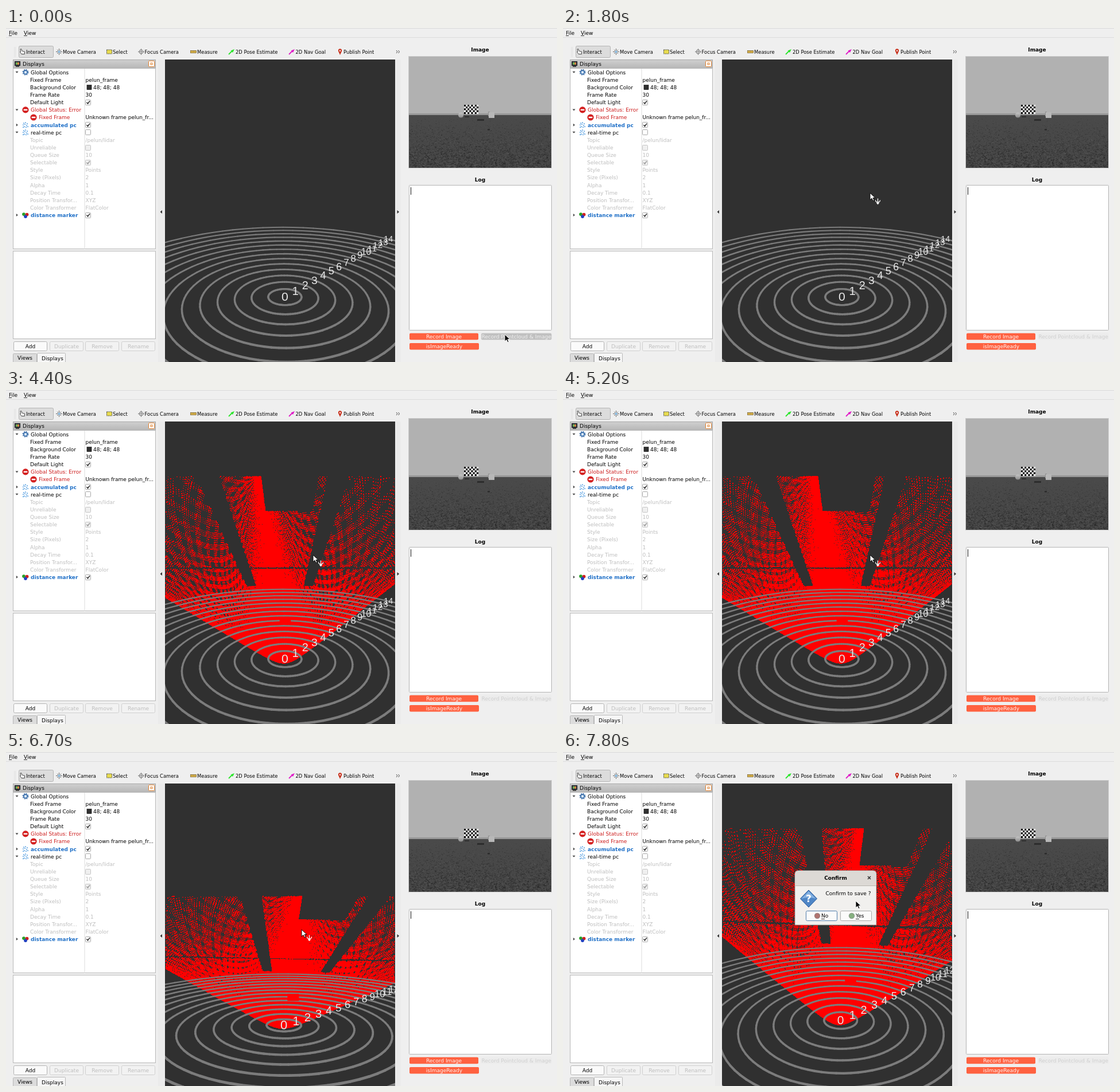
An HTML page with a canvas for the animation above (8000 ms loop, 960 by 583 pixels).

```html
<!DOCTYPE html>
<html lang="en">
<head>
<meta charset="utf-8">
<title>Point cloud recorder</title>
<style>
  html, body { margin: 0; width: 960px; height: 583px; overflow: hidden; background: #efefef; }
  svg, canvas { position: absolute; display: block; }
  svg { left: 0; top: 0; }
  #view { left: 277px; top: 55px; }
  #photo { left: 702px; top: 50px; }
  text { font: 9px "DejaVu Sans", sans-serif; fill: #000; white-space: pre; }
  .b { font-weight: bold; }
  .tool { font-size: 8.4px; }
  .mid { text-anchor: middle; }
  .off { fill: #bebebe; }
  .err { fill: #cc1a1a; }
  .link { fill: #2171c8; font-weight: bold; }
</style>
</head>
<body>
<svg id="ui" width="960" height="583"></svg>
<canvas id="photo" width="248" height="194"></canvas>
<canvas id="view" width="401" height="528"></canvas>
<svg id="top" width="960" height="583"></svg>
<script>
const $ = id => document.getElementById(id);
const rad = Math.PI / 180;

// ---------- SVG helpers ----------
const attrs = o => Object.entries(o).map(([k, v]) => ` ${k}="${v}"`).join('');
const rect = (x, y, w, h, fill, o = {}) =>
  `<rect x="${x}" y="${y}" width="${w}" height="${h}" fill="${fill}"${attrs(o)}/>`;
const circle = (x, y, r, fill, o = {}) => `<circle cx="${x}" cy="${y}" r="${r}" fill="${fill}"${attrs(o)}/>`;
const path = (d, fill, o = {}) => `<path d="${d}" fill="${fill}"${attrs(o)}/>`;
const line = (d, stroke, w = 1) => path(d, 'none', { stroke, 'stroke-width': w });
const text = (x, y, s, cls = '', o = {}) => `<text x="${x}" y="${y}" class="${cls}"${attrs(o)}>${s}</text>`;
const box = (x, y, w, h, fill, stroke, rx = 0) => rect(x + .5, y + .5, w - 1, h - 1, fill, { stroke, rx });

// ---------- static window ----------
function toolbar() {
  const labels = [[35, 'Interact'], [99, 'Move Camera'], [186, 'Select'], [241.5, 'Focus Camera'], [333, 'Measure'],
    [400, '2D Pose Estimate'], [504.5, '2D Nav Goal'], [588, 'Publish Point']];
  const arrow = (x, c) => line(`M${x} 46L${x + 6} 40`, c, 1.8) + path(`M${x + 10} 37L${x + 3.5} 39.5L${x + 7} 43Z`, c);
  return box(22, 31, 61, 21, '#dcdcdc', '#b4b4b4', 2) + line('M14.5 33V51M16.5 33V51', '#e2e2e2') +
    path('M25 37l1.5-.5 2 4 4 .8v4.2h-5.5l-2.5-4 1.5-.5z', '#fff', { stroke: '#333', 'stroke-width': .9 }) +
    line('M87 41.5h11M92.5 36v11M89 38l7 7M96 38l-7 7', '#555', .9) + circle(92.5, 41.5, 2, '#8cc0e8') +
    rect(175.5, 38, 9, 7, '#e8dc50', { stroke: '#444', 'stroke-dasharray': '2 1' }) +
    circle(235.5, 41.5, 3.5, 'none', { stroke: '#777' }) + line('M230 41.500h11M235.500 36v11', '#777', .9) +
    rect(321.5, 39.5, 10, 4, '#e8c050', { stroke: '#665020', 'stroke-width': .7 }) +
    line('M324 40v2M326.500 40v2M329 40v2', '#665020', .6) +
    arrow(388, '#2ce62c') + arrow(493, '#e01cc8') +
    path('M582 47L579 40.5a3.2 3.2 0 1 1 6 0Z', '#c8321e') + circle(582, 39.8, 1.2, '#fff') +
    labels.map(([x, s]) => text(x, 44.8, s, 'tool')).join('') +
    line('M680 39l2 2.5-2 2.5M683.5 39l2 2.5-2 2.5', '#333', .9);
}

const rowY = i => 77.3 + 13.12 * i;
const check = (y, on, dim) => box(138, Math.round(y) - 5, 10, 10, dim ? '#f0f0f0' : '#fff', dim ? '#c4c4c4' : '#a8a8a8', 1) +
  (on ? line(`M140.5 ${y}l2 2.3 3.5-4.8`, dim ? '#999' : '#222', 1.5) : '');
const cloudIcon = y => [[-3, -3], [0, -4], [3, -2], [-4, 0], [-1, -1], [2, 1], [4, 3], [-2, 3], [1, 4], [-4, 4]]
  .map(([x, d]) => circle(34 + x, y + d, .9, '#3a90dc')).join('');
const stopIcon = (x, y) => circle(x, y, 5.6, '#d42020') + rect(x - 3.3, y - 1.2, 6.6, 2.4, '#fff');

function tree() {
  // label, value (true/false is a check box), class, label x
  const rows = [['Global Options', , '', 43], ['Fixed Frame', 'pelun_frame'], ['Background Color', '48; 48; 48'],
    ['Frame Rate', '30'], ['Default Light', true], ['Global Status: Error', , 'err', 43],
    ['Fixed Frame', 'Unknown frame pelun_fr...', 'err', 57], ['accumulated pc', true, 'link', 43],
    ['real-time pc', false, '', 43], ['Topic', '/pelun/lidar', 'off'], ['Unreliable', false, 'off'],
    ['Queue Size', '10', 'off'], ['Selectable', true, 'off'], ['Style', 'Points', 'off'], ['Size (Pixels)', '2', 'off'],
    ['Alpha', '1', 'off'], ['Decay Time', '0.1', 'off'], ['Position Transfor...', 'XYZ', 'off'],
    ['Color Transformer', 'FlatColor', 'off'], ['distance marker', true, 'link', 43]];
  let s = line('M137 71V386', '#dcdcdc');
  rows.forEach(([label, value, cls = '', x = 42], i) => {
    const y = rowY(i);
    s += text(x, y + 3.4, label, cls);
    if (typeof value === 'boolean') s += check(y, value, cls === 'off');
    else if (value) s += text(i === 2 ? 152 : 138.5, y + 3.4, value, cls === 'off' ? cls : '');
  });
  const down = i => path(`M16.5 ${rowY(i) - 1.5}h5l-2.5 3z`, '#444');
  const right = i => path(`M17.8 ${rowY(i) - 2.5}v5l3-2.5z`, '#444');
  s += [0, 5, 8].map(down).join('') + [7, 19].map(right).join('');
  s += circle(34, rowY(0), 3.4, '#a8c8e8', { stroke: '#3c6ea8', 'stroke-width': 1.6 }) +
    circle(34, rowY(0), 4.8, 'none', { stroke: '#3c6ea8', 'stroke-width': 1.4, 'stroke-dasharray': '1.9 1.9' }) +
    circle(34, rowY(0), 1.2, '#fff');
  s += rect(141, rowY(2) - 4, 8, 8, '#303030', { stroke: '#000', 'stroke-width': .6 });
  s += stopIcon(34, rowY(5)) + stopIcon(48, rowY(6)) + cloudIcon(rowY(7)) + cloudIcon(rowY(8));
  const m = rowY(19);
  return s + circle(31, m - 1.5, 2.9, '#28a028') + circle(36.5, m - 1, 2.9, '#d02020') + circle(34, m + 2.5, 2.9, '#2040c0');
}

function drawWindow() {
  const button = (x, s, cls) => box(x, 547, 59, 17, cls ? '#f2f2f2' : '#fafafa', cls ? '#d0d0d0' : '#b4b4b4', 2) +
    text(x + 29.5, 559, s, 'mid ' + cls);
  const orange = (y, w, s) => rect(703, y, w, 11.5, '#ff6140', { rx: 2 }) +
    text(703 + w / 2, y + 9, s, 'mid', { style: 'fill:#fff4f0' });
  $('ui').innerHTML = rect(0, 0, 960, 583, '#efefef') + rect(0, 0, 960, 1, '#dadada') + line('M0 16.5H960', '#dcdcdc') +
    text(5, 12, 'File') + text(31, 12, 'View') + line('M5 13.5h5M31 13.5h6', '#000', .8) + toolbar() +
    '<linearGradient id="bar" x2="0" y2="1"><stop stop-color="#d0d0d0"/><stop offset="1" stop-color="#b6b6b6"/></linearGradient>' +
    box(12, 55, 249, 16, 'url(#bar)', '#a8a8a8') + box(15, 58, 10, 8, '#303848', '#222') + rect(17, 66, 6, 2, '#444') +
    rect(17, 60, 3, 4, '#70b050') + rect(20, 60, 3, 4, '#d08040') + text(29, 66.3, 'Displays') +
    box(248, 57, 11, 11, '#fff', '#e0802c', 1) + rect(252, 61, 3, 3, 'none', { stroke: '#e0802c' }) +
    box(12, 70, 249, 316, '#fff', '#b8b8b8') + tree() +
    box(12, 389, 249, 154, '#fff', '#b8b8b8') +
    button(13, 'Add', '') + button(76, 'Duplicate', 'off') + button(138, 'Remove', 'off') + button(201, 'Rename', 'off') +
    box(12, 568, 42, 20, '#dcdcdc', '#b8b8b8', 1) + box(54, 567, 50, 20, '#f6f6f6', '#b8b8b8', 1) +
    text(20, 579.3, 'Views') + text(62, 580, 'Displays') +
    rect(265, 55, 11, 528, '#ebebeb') + rect(679, 55, 9, 528, '#ebebeb') +
    path('M272 318v6l-3.5-3z', '#333') + path('M681.5 318v6l3.5-3z', '#333') +
    text(826, 41, 'Image', 'b mid') + text(826, 267.5, 'Log', 'b mid') +
    rect(701.5, 49.5, 249, 195, 'none', { stroke: '#ccc' }) +
    box(702, 274, 249, 254, '#fff', '#b4b4b4', 1) + line('M705.5 278V291', '#111') +
    orange(532.7, 120, 'Record Image') + orange(550, 121, 'isImageReady') +
    rect(828, 532.7, 122.5, 11.5, '#c0c0c0', { rx: 2, id: 'recBox' }) +
    text(889.2, 541.7, 'Record Pointcloud &amp; Image', 'mid', { id: 'recText' });
}

function drawPhoto() {
  const g = $('photo').getContext('2d');
  const fill = (c, x, y, w, h) => { g.fillStyle = c; g.fillRect(x, y, w, h); };
  const ramp = (y0, y1, a, b) => {
    const r = g.createLinearGradient(0, y0, 0, y1);
    r.addColorStop(0, a); r.addColorStop(1, b);
    return r;
  };
  fill('#b1b1b1', 0, 0, 248, 101);
  fill('#989898', 0, 99, 248, 3);
  fill(ramp(102, 194, '#4a4a4a', '#444'), 0, 102, 248, 92);
  let seed = 7;
  const rnd = () => (seed = seed * 16807 % 2147483647) / 2147483647;
  for (let i = 0; i < 5200; i++) {
    const k = Math.sqrt(rnd()), v = rnd() < .5 ? 24 + rnd() * 25 : 75 + rnd() * 30;
    fill(`rgba(${v},${v},${v},.5)`, rnd() * 248, 103 + k * 91, .8 + k * 1.3, .6 + k * .5);
  }
  fill('#2c2c2c', 119, 109, 12, 3);
  fill('#303030', 97, 104, 8, 2);
  fill('#262626', 137, 126.5, 4, 2);
  g.fillStyle = ramp(97, 107, '#c8c8c8', '#888');
  g.beginPath(); g.arc(90.5, 102, 4.6, 0, 7); g.fill();
  fill('#909090', 138, 96, 3, 8);
  fill('#b8b8b8', 139, 97, 10, 10);
  for (let i = 0; i < 40; i++)
    fill((i % 8 + (i >> 3)) % 2 ? '#fff' : '#080808', 96 + i % 8 * 3.125, 84 + (i >> 3) * 3.2, 3.2, 3.2);
}

// ---------- 3D view ----------
const W = 401, H = 528, focal = 637, orbit = 21.25, focus = [-.29, .6, 5.2], labelAngle = 41.3 * rad;
const ctx = $('view').getContext('2d');
const img = ctx.createImageData(W, H), pix = new Uint32Array(img.data.buffer);

// Orbit camera: maps a ground point to [screen x, screen y, depth].
function camera(pitch, yaw) {
  const c = Math.cos(pitch * rad), s = Math.sin(pitch * rad), cy = Math.cos(yaw * rad), sy = Math.sin(yaw * rad);
  const drop = orbit * s + focus[2];
  return (x, y, out) => {
    x -= focus[0]; y -= focus[1];
    const ahead = y * cy - x * sy + orbit * c;
    out[2] = ahead * c + drop * s;
    out[0] = W / 2 + focal * (x * cy + y * sy) / out[2];
    out[1] = H / 2 + focal * (drop * c - ahead * s) / out[2];
    return out;
  };
}

// Rosette scan of a lidar whose rays fall on the ground plane.
const rate = 230, scanStart = 1900;
const scan = (() => {
  const n = rate * 3300, px = [], py = [], born = [];
  const lidarH = .6, back = 1.35, axis = -3.1 * rad, spread = .64;
  for (let i = 0; i < n; i++) {
    const p = i * .007, r = Math.tan(spread * Math.cos(p)), v = r * Math.sin(p * .2236);
    if (v >= -1e-5) continue;
    const u = r * Math.cos(p * .2236), f = -lidarH / v, d = f * Math.sqrt(1 + u * u);
    const a = Math.atan(u) + axis, deg = a / rad, y = d * Math.cos(a) - back;
    const shadow = y > 15 && (deg > -12.5 && deg < -9.2 || deg > 7.2 && deg < 10.4) ||
      y > 96 && deg > -2.9 && deg < 5.8 || y > 22.1 && y < 22.9;
    if (shadow) continue;
    px.push(d * Math.sin(a)); py.push(y); born.push(i);
  }
  return { x: Float32Array.from(px), y: Float32Array.from(py), born };
})();

function drawScan(project, limit) {
  const p = [0, 0, 0], { x, y, born } = scan, half = .75;
  pix.fill(0xff303030);
  for (let i = 0; i < born.length && born[i] < limit; i++) {
    project(x[i], y[i], p);
    if (p[2] < .1 || p[0] < 1 || p[1] < 1 || p[0] > W - 1 || p[1] > H - 1) continue;
    const x1 = Math.round(p[0] + half), y1 = Math.round(p[1] + half);
    for (let py = Math.round(p[1] - half); py < y1; py++)
      for (let px = Math.round(p[0] - half); px < x1; px++) pix[py * W + px] = 0xff0000ff;
  }
  ctx.putImageData(img, 0, 0);
}

function drawView(pitch, yaw, limit) {
  const project = camera(pitch, yaw);
  const polar = (r, a) => project(r * Math.sin(a), r * Math.cos(a), []);
  drawScan(project, limit);
  ctx.strokeStyle = '#7c7c7c';
  ctx.lineCap = 'round';
  for (let r = 1; r <= 14; r++) {
    let a = polar(r, 0);
    for (let k = 1; k <= 90; k++) {
      const b = polar(r, k * 4 * rad);
      ctx.lineWidth = 72 / b[2];
      ctx.beginPath(); ctx.moveTo(a[0], a[1]); ctx.lineTo(b[0], b[1]); ctx.stroke();
      a = b;
    }
  }
  if (limit > 0) {
    const [x, y, d] = project(.1, 5.9, []);
    ctx.fillStyle = '#f00';
    ctx.fillRect(x - 270 / d, y - 160 / d, 540 / d, 330 / d);
  }
  ctx.fillStyle = '#e8e8e8';
  ctx.textAlign = 'center';
  for (let n = 0; n <= 14; n++) {
    const [x, y, d] = polar(n, labelAngle), size = 465 / d;
    ctx.font = `${size}px "Liberation Sans", Arial, sans-serif`;
    ctx.fillText(n, x, y + size * .35);
  }
}

// ---------- dialogs and pointer ----------
function dialog(id, x, w, question, noX, yesX, focusYes) {
  const btn = (bx, s, c, hot, fill) => box(bx, 277, 55, 18, fill, hot ? '#4f7cab' : '#aaa', 2) +
    circle(bx + 20, 286, 4.8, c, { stroke: '#777', 'stroke-width': .6 }) + text(bx + 27, 289.3, s) +
    line(`M${bx + 27} 291.5h6`, '#000', .8);
  const icx = x + 24;
  return `<g id="${id}">` +
    path(`M${x} 302V213q0-6 6-6h${w - 12}q6 0 6 6V302z`, '#f1f0ee', { stroke: '#8a8884', 'stroke-width': .8 }) +
    path(`M${x + .5} 233V213q0-5.5 5.5-5.5h${w - 12}q5.5 0 5.5 5.5V233z`, '#dcd9d5') +
    line(`M${x} 233.5h${w}`, '#bab6b0') + text(x + w / 2, 222.5, 'Confirm', 'b mid') +
    line(`M${x + w - 15} 217l5 5m0-5l-5 5`, '#333', 1.5) +
    path(`M${icx} 241l14.5 15-14.5 15-14.5-15z`, '#4f86c6', { stroke: '#2c5d9c' }) +
    path(`M${icx} 243l12.5 13q-12.5-4-25 0z`, '#86b2e2') +
    text(icx, 262, '?', 'b mid', { style: 'fill:#fff;font-size:17px' }) +
    text(x + 53.5, 250.3, question) +
    btn(noX, 'No', '#b07470', !focusYes, '#fbfbfa') + btn(yesX, 'Yes', '#86b080', focusYes, focusYes ? '#c3cfdc' : '#fbfbfa') + '</g>';
}

const arrowShape = 'M0 0V12L3 9.3L5 13.6L7 12.7L5.1 8.5H9Z';
function drawTop() {
  $('top').innerHTML = dialog('ask', 400, 150, 'Confirm to record ?', 428, 487, true) +
    dialog('save', 404, 142, 'Confirm to save ?', 423, 483, false) +
    '<g id="click">' + circle(535, 286, 12, 'none', { stroke: '#e01818', 'stroke-width': 1.3 }) +
    circle(535, 286, 5, 'none', { stroke: '#e01818', 'stroke-width': 1.2 }) + '</g><g id="pointer">' +
    path(arrowShape, '#000', { id: 'arrow', 'stroke-width': .9 }) +
    '<g id="hint">' + line('M13.5 9.5V19M9.5 12.5q0 3.5 4 3.5t4-3.5M11.5 17l2 2.3 2-2.3', '#fff', 1.3) + '</g></g>';
}

// ---------- timeline ----------
// Each key is [time, value, value].
const pointerKeys = [[100, 869, 535], [900, 535, 288], [5300, 535, 288], [5700, 522, 256], [6200, 511, 267],
  [6700, 515, 310], [7300, 515, 311], [7700, 510, 260]];
const cameraKeys = [[5300, 14.8, 0], [5700, 2.11, 5.2], [6200, 6, 6.3], [6800, 6, 6.3], [7000, 13.2, 6.3],
  [7300, 13.2, 6.3], [7500, 16.24, 6.9]];
const scanTimes = [2000, 2100, 2200, 2400, 2900, 3200, 3300, 3500, 3700, 3900, 4200, 4400, 4700, 4900, 5000, 5100, 5200];

function at(keys, t) {
  const i = keys.findIndex(k => k[0] > t);
  if (i < 0) return keys[keys.length - 1].slice(1);
  if (i === 0) return keys[0].slice(1);
  const a = keys[i - 1], b = keys[i], k = (t - a[0]) / (b[0] - a[0]);
  return [a[1] + (b[1] - a[1]) * k, a[2] + (b[2] - a[2]) * k];
}
const show = (id, on) => { $(id).style.display = on ? '' : 'none'; };

let lastView = '';
function render(t) {
  const [pitch, yaw] = at(cameraKeys, t), [x, y] = at(pointerKeys, t);
  const update = scanTimes.filter(s => s <= t).pop() || scanStart;
  const key = [pitch, yaw, update].join();
  if (key !== lastView) drawView(pitch, yaw, rate * (update - scanStart));
  lastView = key;

  show('ask', t >= 300 && t < 1500);
  show('save', t >= 7600);
  show('click', t >= 1000 && t < 1500);
  const inView = t >= 700 && t < 7600;
  show('hint', inView);
  $('pointer').setAttribute('transform', `translate(${x} ${y})`);
  $('arrow').setAttribute('fill', inView ? '#fff' : '#000');
  $('arrow').setAttribute('stroke', inView ? '#000' : '#fff');

  const [fill, ink] = t < 200 ? ['#c0c0c0', '#eee'] : t < 1600 ? ['#ff6140', '#fff4f0'] : ['#ececec', '#cfcfcf'];
  $('recBox').setAttribute('fill', fill);
  $('recText').style.fill = ink;
}

drawWindow();
drawPhoto();
drawTop();
const began = performance.now();
let lastStep = -1;
function tick() {
  const t = Math.floor((performance.now() - began) % 8000 / 100) * 100;
  if (t !== lastStep) render(lastStep = t);
  requestAnimationFrame(tick);
}
tick();
</script>
</body>
</html>
```
